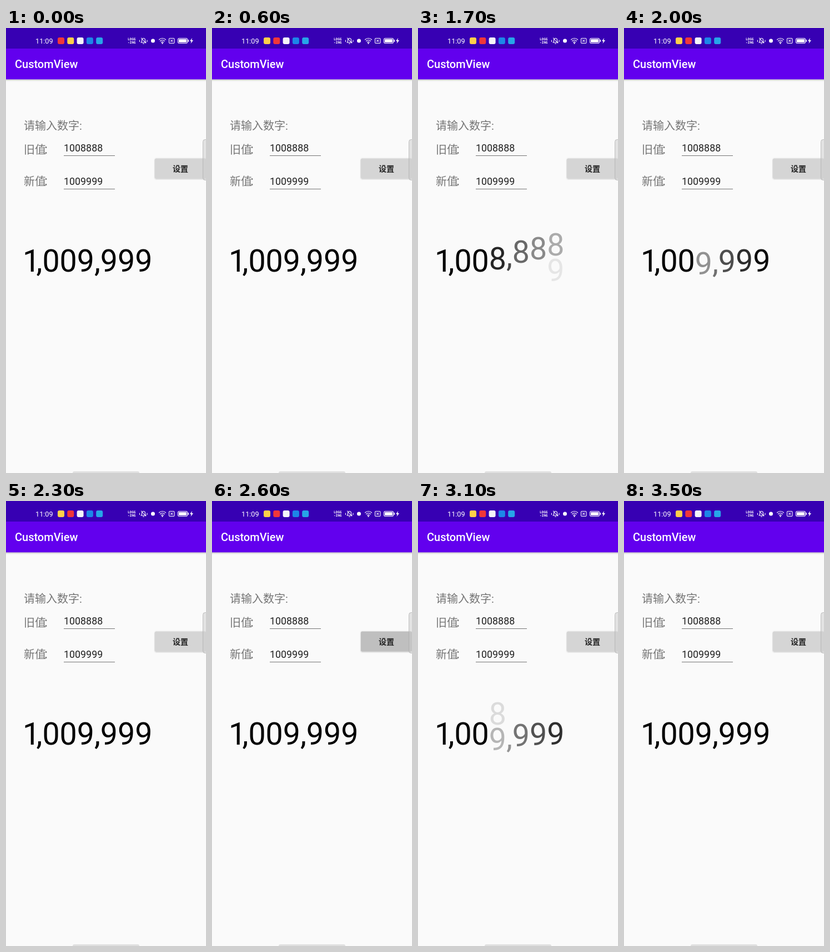
An HTML page that plays this animation: 360x800 px, repeating every 3.6 s.

```html
<!DOCTYPE html>
<html lang="zh-CN">
<head>
<meta charset="utf-8">
<title>CustomView</title>
<style>
html, body { margin: 0; width: 100%; height: 100%; overflow: hidden; background: #fafafa; }
svg { display: block; font-family: Roboto, "Noto Sans CJK SC", "Noto Sans CJK", sans-serif; }
.label { font-size: 20px; fill: #757575; }
.field { font-size: 17.85px; fill: #212121; }
.line { fill: none; stroke: #fff; stroke-width: 1.1; stroke-linecap: round; stroke-linejoin: round; }
#number { font-size: 55.5px; }
</style>
</head>
<body>
<svg width="360" height="800" viewBox="0 0 360 800">
  <defs>
    <linearGradient id="shade" x2="0" y2="1">
      <stop stop-opacity=".22"/><stop offset="1" stop-opacity="0"/>
    </linearGradient>
    <clipPath id="buttonClip"><rect x="268" y="234.500" width="92" height="36" rx="2"/></clipPath>
    <filter id="drop" x="-10%" y="-20%" width="120%" height="150%">
      <feDropShadow dx="0" dy=".7" stdDeviation=".8" flood-opacity=".3"/>
    </filter>
  </defs>
  <rect width="360" height="800" fill="#fafafa"/>
  <rect y="92" width="360" height="4" fill="url(#shade)"/>
  <rect y="37" width="360" height="55.300" fill="#6200ee"/>
  <rect width="360" height="37" fill="#3700b3"/>

  <!-- status bar -->
  <text x="53" y="27.500" font-size="12.700" fill="#fff">11:09</text>
  <g id="apps"></g>
  <g fill="#fff" font-family="'DejaVu Sans Mono', monospace" font-weight="700" font-size="6">
    <text x="219" y="22">LOGG</text><text x="219" y="28">-ING</text>
  </g>
  <g class="line">
    <path d="M243 26h9l-1.500-2v-2.500a3 3 0 0 0-6 0V24zM246.500 28h2M243.500 18l8 9M240.500 22v2.500M254 22v2.500"/>
    <path d="M275.500 21a8.500 8.500 0 0 1 12 0M277.500 23.500a5.500 5.500 0 0 1 8 0M279.500 25.700a3 3 0 0 1 4 0"/>
    <rect x="293.500" y="18.500" width="9.500" height="9" rx="1.500"/>
    <path d="M296.500 21.300l3.500 3.500m0-3.500l-3.500 3.500"/>
    <rect x="309.500" y="18.500" width="17" height="9" rx="2.500"/>
  </g>
  <g fill="#fff">
    <circle cx="264.500" cy="23" r="3.500"/>
    <circle cx="281.500" cy="27.500" r="1.200"/>
    <rect x="311" y="20" width="14" height="6" rx="1"/>
    <rect x="327.500" y="21" width="1.500" height="4"/>
    <path d="M335 18l-4 5.500h2.500l-1 4.500 4.500-6h-2.700z"/>
  </g>
  <text x="16" y="72" font-size="20" font-weight="500" fill="#fff">CustomView</text>

  <!-- form -->
  <g class="label">
    <text x="32" y="183">请输入数字:</text>
    <text x="32" y="226">旧值<tspan dx="-5">：</tspan></text>
    <text x="32" y="282.500">新值<tspan dx="-5">：</tspan></text>
  </g>
  <g class="field">
    <text x="104" y="222">1008888</text>
    <text x="104" y="282">1009999</text>
  </g>
  <path d="M104 229.500h92M104 289.500h92" stroke="#757575"/>
  <rect x="268" y="234.500" width="92" height="36" rx="2" fill="#d5d5d5" filter="url(#drop)"/>
  <g id="ripple" clip-path="url(#buttonClip)">
    <rect x="268" y="234" width="92" height="37"/><circle cx="317" cy="253"/>
  </g>
  <text x="314" y="258" font-size="14" font-weight="700" text-anchor="middle" fill="#212121">设置</text>
  <rect x="354.500" y="200.500" width="14" height="73" rx="4" fill="#ccc" fill-opacity=".5" stroke="#aaa" stroke-opacity=".7"/>

  <g id="number"></g>
  <rect x="120" y="797" width="120" height="6" rx="3" fill="#e0e0e0"/>
</svg>
<script>
const LOOP = 3600, TICK = 100, SWAP = 500;
const ROLLS = [1464, 2614], PRESSES = [1300, 2550];
const OLD = '1,008,888', NEW = '1,009,999';
const FIRST = 4, STAGGER = 46, DURATION = 552, ROW = 46, BASE = 437.6;

const $ = id => document.getElementById(id);
const clamp = v => Math.min(1, Math.max(0, v));
const ease = t => 1 - (1 - t) ** 3 * (1 + 2.5 * t);

function add(parent, tag, attrs, text = '') {
  const el = document.createElementNS('http://www.w3.org/2000/svg', tag);
  for (const k in attrs) el.setAttribute(k, attrs[k]);
  el.textContent = text;
  return parent.appendChild(el);
}

const apps = ['#f0373a', '#ffd04a', '#f4f4f8', '#1d86e8', '#27a5e8'].map((fill, i) =>
  add($('apps'), 'rect', { x: 93 + i * 17.3, y: 17, width: 12, height: 12, rx: 3, fill }));

let x = 30;
const chars = [...OLD].map((c, i) => {
  const pair = [c, NEW[i]].map(s => add($('number'), 'text', { x, y: BASE }, s));
  x += c === ',' ? 10.9 : i ? 31.17 : 24.5;   // the leading 1 is set narrow
  return pair;
});

function place(el, y, opacity) {
  el.setAttribute('y', y);
  el.setAttribute('opacity', clamp(opacity));
}

function draw(now) {
  const time = Math.floor(now % LOOP / TICK) * TICK;
  const latest = list => time - (list.filter(s => s <= time).pop() ?? -LOOP);

  apps[0].setAttribute('x', time < SWAP ? 93 : 110.3);
  apps[1].setAttribute('x', time < SWAP ? 110.3 : 93);

  const sinceRoll = latest(ROLLS);
  chars.forEach(([before, after], i) => {
    const wait = (chars.length - 1 - i) * STAGGER;
    const t = i < FIRST ? 1 : clamp((sinceRoll - wait) / DURATION);
    const y = BASE - ROW * ease(t);
    place(before, y, 1 - t / 0.62);
    place(after, y + ROW, (t - 0.38) / 0.62);
  });

  const age = latest(PRESSES);
  $('ripple').setAttribute('opacity', Math.min(.05 + age / 1000, .12) * clamp((400 - age) / 250));
  $('ripple').lastElementChild.setAttribute('r', 24 + age * .22);
}

const start = performance.now();
function frame() {
  draw(performance.now() - start);
  requestAnimationFrame(frame);
}
frame();
</script>
</body>
</html>
```
